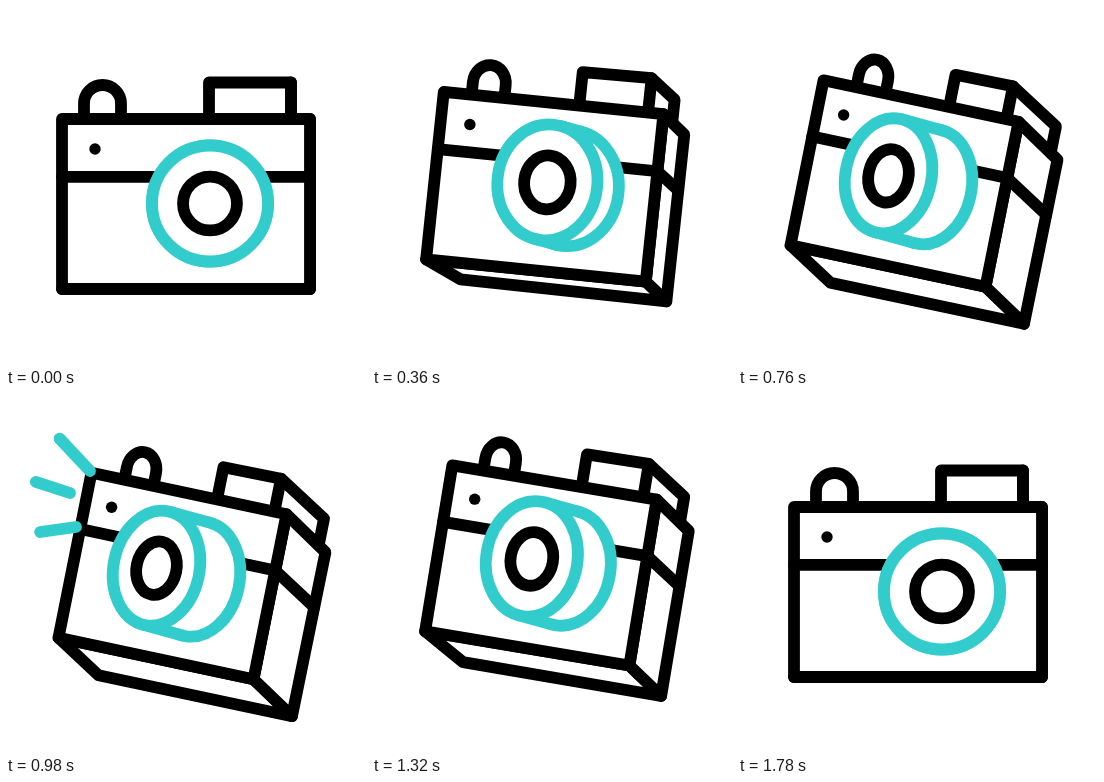
Animation, 360 px wide and 360 px high, one loop 2.4 s. Source, as an HTML page with a canvas:

```html
<!DOCTYPE html>
<html lang="en">
<head>
<meta charset="utf-8">
<title>Camera</title>
<style>
html, body { margin: 0; height: 100%; overflow: hidden; background: #fff; }
canvas { display: block; }
</style>
</head>
<body>
<canvas id="stage" width="360" height="360"></canvas>
<script>
const ctx = document.getElementById('stage').getContext('2d');
const LOOP = 2400, BLACK = '#000', TEAL = '#33cccc';

const clamp = x => Math.min(1, Math.max(0, x));
const smooth = x => (x = clamp(x), x * x * (3 - 2 * x));
const easeOut = x => 1 - (1 - clamp(x)) ** 2;
const add = (p, v, k = 1) => [p[0] + v[0] * k, p[1] + v[1] * k];
const mix = (a, b, k) => [a[0] + (b[0] - a[0]) * k, a[1] + (b[1] - a[1]) * k];
const cross = (a, b) => a[0] * b[1] - a[1] * b[0];

function trace(pts) {
  ctx.beginPath();
  pts.forEach(p => ctx.lineTo(...p));
}

function paint(color, filled) {
  ctx.fillStyle = '#fff';
  ctx.strokeStyle = color;
  if (filled) ctx.fill();
  ctx.stroke();
}

function line(color, ...pts) {
  trace(pts);
  paint(color);
}

function face(...pts) {
  trace(pts);
  ctx.closePath();
  paint(BLACK, true);
}

function ellipse(c, rx, ry, tilt, color) {
  ctx.beginPath();
  ctx.ellipse(...c, rx, ry, tilt, 0, 2 * Math.PI);
  paint(color, true);
}

// u: how far the camera is turned; drop: downward push at the shot
function drawCamera(u, drop) {
  const at = (x, y, dx, dy) => [x + dx * u, y + dy * u + drop];
  const across = [248 - 53 * u, 41.5 * u];
  const down = [-33 * u, 170 - 5 * u];
  const tl = at(56, 113, 29.5, -50.5);
  const tr = add(tl, across), bl = add(tl, down), br = add(tr, down);
  const backTr = at(304, 113, 15.5, 29);
  const backBr = at(304, 283, -18, 23);
  const backBl = at(84, 283, 8.5, -18);

  // Viewfinder
  const vl = at(203, 76.5, 14.5, -19.5), vr = at(285, 76.5, -10, -8), vb = at(285, 76.5, 33, 32);
  line(BLACK, vr, vb, add(vb, down, 0.2));
  line(BLACK, add(vl, down, 0.2), vl, vr, add(vr, down, 0.21));

  // Shutter button
  const top = at(96.5, 79, 42.5, -37);
  ctx.save();
  ctx.transform(across[0] / 248, across[1] / 248, down[0] / 170, down[1] / 170, ...top);
  ctx.beginPath();
  ctx.moveTo(-18.5, 34);
  ctx.arc(0, 18.5, 18.5, Math.PI, 0);
  ctx.lineTo(18.5, 34);
  ctx.restore();
  paint(BLACK);

  // Body
  face(bl, backBl, backBr, br);
  face(tr, backTr, backBr, br);
  face(tl, tr, br, bl);
  const stripe = 0.341;
  line(BLACK, add(tl, down, stripe), add(tr, down, stripe), mix(backTr, backBr, stripe - 0.006));
  ctx.beginPath();
  ctx.arc(...add(add(tl, across, 33 / 248), down, 30 / 170), 5.7, 0, 2 * Math.PI);
  ctx.fillStyle = BLACK;
  ctx.fill();

  // Lens: two rims joined by their common tangents
  const front = at(204, 197.5, -53.5, -39.5), back = at(204, 197.5, -13.5, -28.5);
  const rx = 58 - 15 * u, ry = 58, tilt = 0.21 * u;
  const a = [rx * Math.cos(tilt), rx * Math.sin(tilt)];
  const b = [-ry * Math.sin(tilt), ry * Math.cos(tilt)];
  const d = [back[0] - front[0], back[1] - front[1]];
  const th = Math.atan2(cross(b, d), cross(a, d));
  const r = add([a[0] * Math.cos(th), a[1] * Math.cos(th)], b, Math.sin(th));
  const sides = [1, -1].map(k => [add(front, r, k), add(back, r, k)]);
  ellipse(back, rx, ry, tilt, TEAL);
  trace([...sides[0], sides[1][1], sides[1][0]]);
  ctx.fill();
  sides.forEach(s => line(TEAL, ...s));
  ellipse(front, rx, ry, tilt, TEAL);
  ellipse(front, rx * 0.465, ry * 0.465, tilt, BLACK);
}

// Flash rays: start, end, time for the tip to travel
const rays = [
  [[84, 77], [23, 12], 312],
  [[64, 99], [11.5, 82], 222],
  [[70, 133], [15, 140.7], 222]
];

function drawRays(t) {
  for (const [from, to, span] of rays) {
    const tip = easeOut((t - 890) / span), tail = smooth((t - 980) / 220);
    if (tip > tail) line(TEAL, mix(from, to, tail), mix(from, to, tip));
  }
}

function frame() {
  const t = performance.now() % LOOP;
  const moving = t >= 20 && t < 1780;
  const u = moving ? smooth(t / 690) - smooth((t - 1140) / 680) : 0;
  const press = Math.min(1, Math.abs(t - 912) / 390);
  ctx.clearRect(0, 0, 360, 360);
  ctx.lineWidth = 11.8;
  ctx.lineCap = ctx.lineJoin = 'round';
  drawCamera(u, 8.75 * (1 + Math.cos(Math.PI * press)));
  drawRays(t);
  requestAnimationFrame(frame);
}
frame();
</script>
</body>
</html>
```
